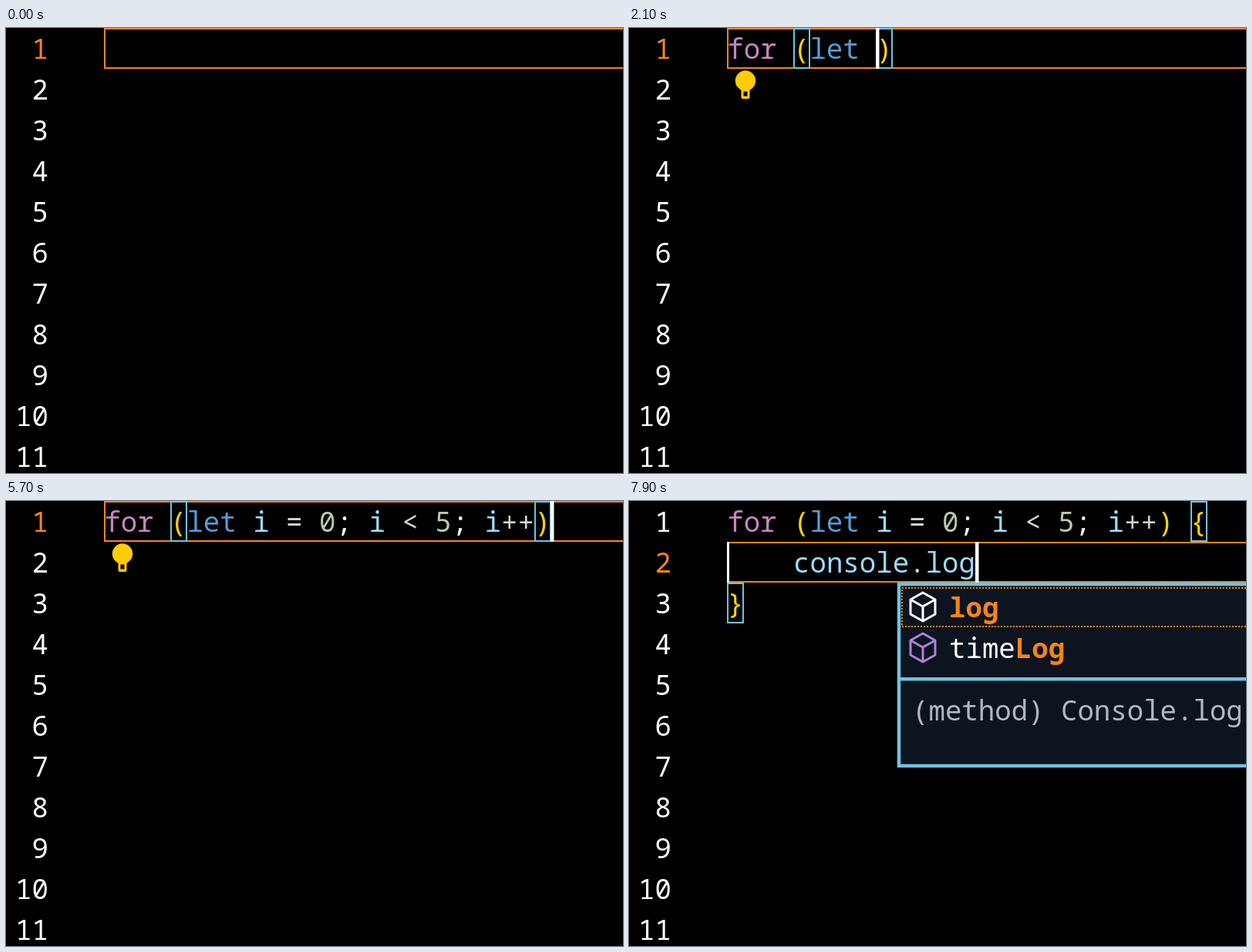
These frames come from a looping animation (800x578 px, 8000 ms). An HTML page:

```html
<!DOCTYPE html>
<html lang="en">
<head>
<meta charset="utf-8">
<title>Typing a loop</title>
<style>
  html, body { margin: 0; width: 100%; height: 100%; overflow: hidden; background: #000; }
  svg { display: block; }
  text { font: 500 35.74px "Noto Sans Mono", monospace; white-space: pre; fill: #fff; }
  .match { font-weight: 700; fill: #f38518; }
</style>
</head>
<body>
<svg id="stage" width="800" height="578" viewBox="0 0 800 578"></svg>
<script>
const LEFT = 127.2, CHAR = 21.44, ROW = 53, LOOP = 8000;
const ORANGE = '#f38518', CYAN = '#6fc3df', WHITE = '#fff';
const stage = document.getElementById('stage');

// Suggestion lists: [icon, label] rows and documentation lines
const popups = {
  for: {
    rows: [['snippet', 'for'], ['snippet', 'foreach'], ['snippet', 'forin'], ['keyword', 'for'], ['keyword', 'function']],
    doc: ['For Loop (JavaScript)', 'for loop code snippet']
  },
  let: {
    rows: [['keyword', 'let'], ['variable', 'length'], ['cube', 'releaseEvents'], ['variable', 'Element'], ['variable', 'locale']],
    doc: ['let statement', 'let keyword', '', 'let name = value']
  },
  index: {
    rows: [['keyword', 'if'], ['snippet', 'import'], ['keyword', 'in'], ['keyword', 'instanceof'], ['variable', 'Infinity']],
    doc: ['if statement', 'if keyword', '', 'if (condition) {']
  },
  i: {
    rows: [['variable', 'i'], ['keyword', 'if'], ['keyword', 'import'], ['keyword', 'in'], ['keyword', 'instanceof']],
    doc: ['let i: number']
  },
  con: {
    rows: [['snippet', 'con'], ['cube', 'confirm'], ['variable', 'console'], ['keyword', 'const'], ['keyword', 'continue']],
    doc: ['Add default constructor in Ja', 'vaScript (ES6) code snippets', '', '#constructor(params) {', '', '#}']
  },
  console: {
    rows: [['variable', 'console'], ['keyword', 'const'], ['cube', 'constructor'], ['variable', 'Console'], ['variable', 'consume']],
    doc: ['var console: Console', '']
  },
  methods: {
    rows: [['cube', 'assert'], ['cube', 'clear'], ['cube', 'count'], ['cube', 'countReset'], ['cube', 'debug']],
    doc: ['(method) Console.assert', ''], limit: 348
  },
  log: {
    rows: [['cube', 'log'], ['cube', 'timeLog']],
    doc: ['(method) Console.log(', ''], limit: 348
  }
};

// Each step: time, changed state. "|" marks the caret.
const head = 'for (let i = 0; i < 5; i++) {';
const body = typed => `${head}\n    ${typed}|\n}`;
const steps = [
  [0, { text: '|', caret: false, popup: '', bulb: false, hint: '', error: 0, guide: false }],
  [400, { text: 'f|', caret: true }],
  [500, { popup: 'for' }],
  [600, { text: 'fo|' }],
  [800, { text: 'for|' }],
  [1200, { text: 'for |', popup: '' }],
  [1300, { bulb: true }],
  [1400, { text: 'for (|)' }],
  [1600, { text: 'for (l|)', popup: 'let' }],
  [1700, { text: 'for (le|)' }],
  [1800, { text: 'for (let|)' }],
  [2100, { text: 'for (let |)', popup: '' }],
  [2200, { text: 'for (let i|)', popup: 'index' }],
  [2400, { text: 'for (let i |)', popup: '' }],
  [2500, { text: 'for (let i =|)' }],
  [2700, { text: 'for (let i = |)' }],
  [2800, { text: 'for (let i = 0|)' }],
  [2900, { hint: 'long', error: 14 }],
  [3200, { text: 'for (let i = 0;|)', hint: 'short', error: 15 }],
  [3600, { text: 'for (let i = 0; |)', bulb: false, hint: 'dashes' }],
  [3700, { text: 'for (let i = 0; i|)', popup: 'i' }],
  [3900, { text: 'for (let i = 0; i |)', popup: '' }],
  [4000, { text: 'for (let i = 0; i <|)' }],
  [4200, { text: 'for (let i = 0; i < |)' }],
  [4300, { text: 'for (let i = 0; i < 5|)' }],
  [4500, { text: 'for (let i = 0; i < 5;|)', error: 0 }],
  [4700, { text: 'for (let i = 0; i < 5; |)' }],
  [4900, { text: 'for (let i = 0; i < 5; i|)', popup: 'i', hint: '' }],
  [5300, { text: 'for (let i = 0; i < 5; i+|)', popup: '' }],
  [5400, { text: 'for (let i = 0; i < 5; i++|)' }],
  [5600, { bulb: true }],
  [5700, { text: 'for (let i = 0; i < 5; i++)|' }],
  [5900, { text: 'for (let i = 0; i < 5; i++) |' }],
  [6100, { text: head + '|}' }],
  [6200, { text: body(''), bulb: false }],
  [6500, { guide: true }],
  [6700, { text: body('co'), popup: 'con' }],
  [6800, { text: body('con') }],
  [6900, { text: body('cons'), popup: 'console' }],
  [7000, { text: body('conso') }],
  [7200, { text: body('consol') }],
  [7300, { text: body('console') }],
  [7500, { text: body('console.'), popup: '' }],
  [7600, { popup: 'methods' }],
  [7700, { text: body('console.l'), popup: 'log' }],
  [7800, { text: body('console.lo') }],
  [7900, { text: body('console.log') }]
];
let last = {};
const states = steps.map(([, change]) => last = { ...last, ...change });

const escape = s => s.replace(/&/g, '&amp;').replace(/</g, '&lt;');
const span = (s, fill) => `<tspan fill="${fill}">${escape(s)}</tspan>`;
const text = (x, y, content, attrs = '') => `<text x="${x}" y="${y}" ${attrs}>${content}</text>`;
const box = (x, y, w, h, stroke, width = 2, attrs = '') =>
  `<rect x="${x}" y="${y}" width="${w}" height="${h}" fill="none" stroke="${stroke}" stroke-width="${width}" ${attrs}/>`;
const bar = (x, y, w, h, fill) => `<rect x="${x}" y="${y}" width="${w}" height="${h}" fill="${fill}"/>`;
const line = (d, stroke, width = 3, attrs = '') =>
  `<path d="${d}" fill="none" stroke="${stroke}" stroke-width="${width}" ${attrs}/>`;
const colX = col => LEFT + col * CHAR;

const tokens = [
  [/^for(?= \()/, '#c586c0'],
  [/^let(?= )/, '#569cd6'],
  [/^[a-z]+(?=\()/, '#dcdcaa'],
  [/^[a-z]+/, '#9cdcfe'],
  [/^\d+/, '#b5cea8'],
  [/^;/, WHITE],
  [/^[(){}]/, '#ffd700'],
  [/^[^]/, '#d4d4d4']
];
function code(s, bracket = '#ffd700') {
  let out = '';
  while (s) {
    const [rule, fill] = tokens.find(([r]) => r.test(s));
    const part = s.match(rule)[0];
    out += span(part, fill === '#ffd700' ? bracket : fill);
    s = s.slice(part.length);
  }
  return out;
}

const icons = {
  snippet: () => line('M-17.500 16V-18.500H17.500V16', WHITE) + line('M-18 18H19', WHITE, 3, 'stroke-dasharray="4 2.600"'),
  cube: selected => line('M0-19L16-10V9L0 18L-16 9V-10ZM-16-10L0-1L16-10M0-1V18',
    selected ? WHITE : '#b180d7', 3, 'stroke-linejoin="round"'),
  variable: () => line('M-12-12H-18.500V12H-12M12-12H18.500V12H12M-10-1L2-8L10-4V2L-2 9L-10 5ZM-10-1L-2 3L10-4M-2 3V9', '#75beff', 2.7),
  keyword: () => line('M-18.500-15.500H-1.500V-8.500H-18.500ZM4-12H19M-20-1H6M10-1H19M-20 7H12M-20 15H12M4 7H19', WHITE)
};

function label(name, word) {
  const at = word ? name.toLowerCase().indexOf(word) : -1;
  if (at < 0) return escape(name);
  const end = at + word.length;
  return `${name.slice(0, at)}<tspan class="match">${name.slice(at, end)}</tspan>${name.slice(end)}`;
}

function drawPopup({ rows, doc, limit = 279 }, caretX, y, word) {
  const x = Math.min(limit, Math.round(caretX));
  const split = Math.min(242, rows.length * ROW + 19);
  let docY = split + 1, docText = '';
  doc.forEach(s => {
    docY += s ? ROW : 45;
    if (s) docText += text(19, docY, s[0] === '#' ? code(s.slice(1), '#e0e0e0') : escape(s), s[0] === '#' ? '' : 'style="fill:#b3b8bf"');
  });
  const bottom = docY + 16;
  const list = rows.map(([icon, name], i) =>
    `<g transform="translate(33 ${32 + i * ROW})">${icons[icon](i === 0)}</g>` +
    text(67, 45 + i * ROW, label(name, word))).join('');
  return `<g transform="translate(${x} ${y})">
    <rect width="900" height="${bottom}" fill="#0c141f"/>
    <svg width="900" height="${split}">${list}${box(6, 7, 890, 50, ORANGE, 2, 'stroke-dasharray="2 2"')}</svg>
    ${docText}${bar(0, split - 2, 900, 4.5, CYAN)}${box(2, 2, 900, bottom - 4, CYAN, 4.5)}</g>`;
}

const bulb = () => '<circle cx="151" cy="68.500" r="13.200" fill="#ffcc00"/>' +
  '<path d="M143 76H159L156.500 81V90Q156.500 92 154 92H148Q145.500 92 145.500 90V81Z" fill="#ffcc00"/>' +
  bar(148.5, 82.5, 5, 6, '#000');

function drawHint(kind) {
  if (!kind) return '';
  if (kind === 'dashes') return line('M319 56.500H342', '#ccc', 5, 'stroke-dasharray="9.500 4.500"');
  return line(`M322 57H${kind === 'long' ? 447 : 340}`, '#c4c4c4', 4.5, 'stroke-linecap="round" stroke-dasharray="0 9.100"');
}

const drawError = col => line('M0 55.500H22M0 62.500H22M3 54L11 47L19 54', '#d16969', 3, `transform="translate(${colX(col)} 0)"`);

// The pair of brackets that encloses or touches the caret
function bracketPair(flat, pos) {
  const close = flat.indexOf(')');
  if (flat.includes('{')) return [flat.indexOf('{'), flat.indexOf('}')];
  return close >= 0 && pos <= close + 1 ? [flat.indexOf('('), close] : [];
}

function draw(s) {
  const pos = s.text.indexOf('|');
  const flat = s.text.replace('|', '');
  const place = i => {
    const before = flat.slice(0, i).split('\n');
    return { row: before.length - 1, x: colX(before.at(-1).length) };
  };
  const caret = place(pos), top = caret.row * ROW;
  const word = flat.slice(0, pos).match(/\w*$/)[0];
  let out = '';
  for (let i = 0; i < 11; i++) {
    out += text(55, 40 + i * ROW, i + 1, `text-anchor="end" style="fill:${i === caret.row ? ORANGE : WHITE}"`);
  }
  out += box(128, top + 1, 700, 51, ORANGE);
  if (s.guide) out += bar(127, top, 3, 53, WHITE);
  bracketPair(flat, pos).map(place).forEach(b => out += box(Math.round(b.x) + 1, b.row * ROW + 1, 20, 51, CYAN));
  flat.split('\n').forEach((row, i) => out += text(LEFT, 40 + i * ROW, code(row)));
  out += drawHint(s.hint);
  if (s.error) out += drawError(s.error);
  if (s.bulb) out += bulb();
  if (s.caret) out += bar(Math.round(caret.x), top, 4.5, 53, WHITE);
  if (s.popup) out += drawPopup(popups[s.popup], caret.x + 1.5, top + ROW, word);
  stage.innerHTML = out;
}

let shown = -1;
function frame() {
  const now = performance.now() % LOOP;
  const current = steps.findLastIndex(([start]) => start <= now);
  if (current !== shown) draw(states[shown = current]);
  requestAnimationFrame(frame);
}
frame();
</script>
</body>
</html>
```
